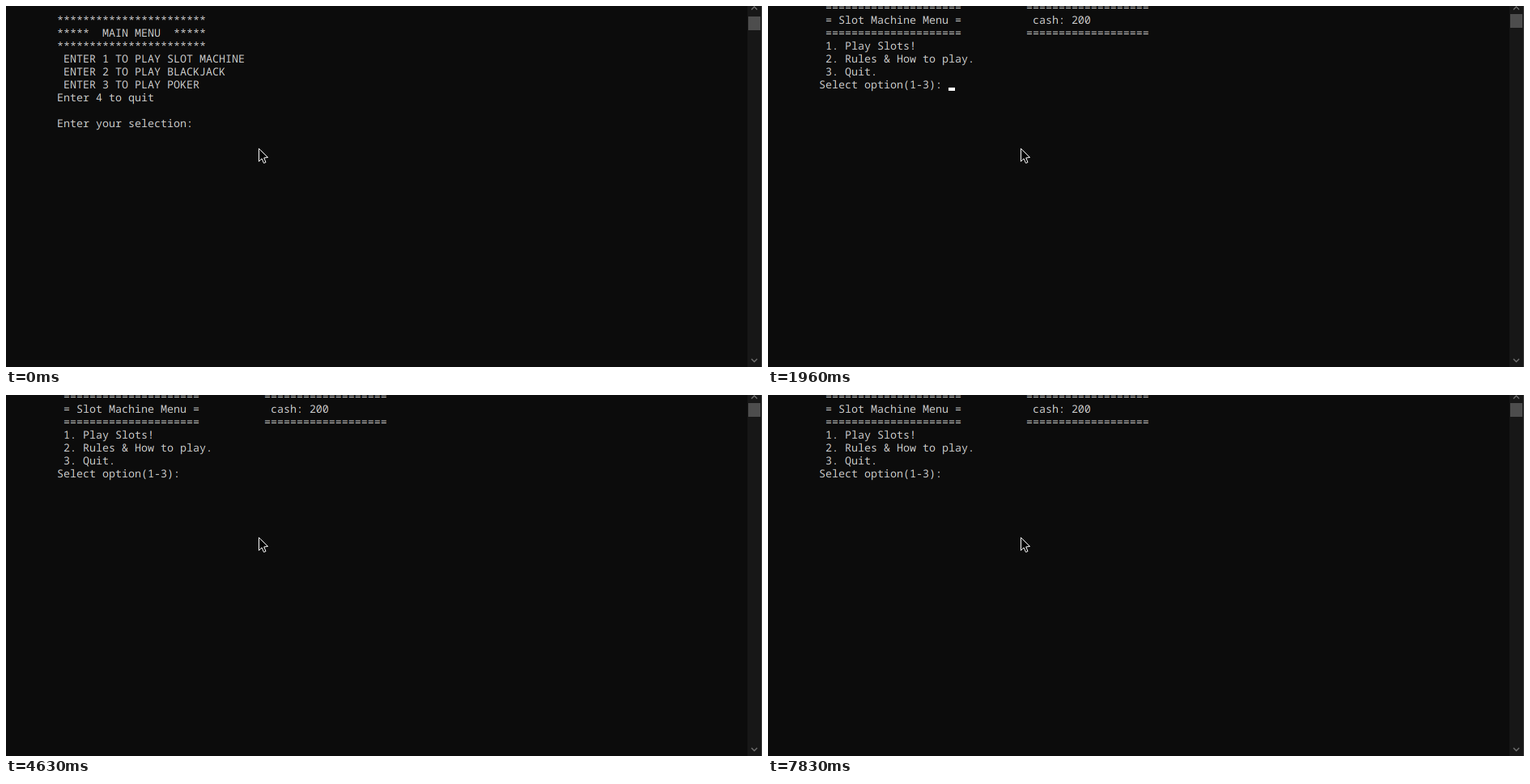
These frames come from a looping animation (934 px wide and 447 px high, 8000 ms). An HTML page with a canvas:

```html
<!DOCTYPE html>
<html lang="en">
<head>
<meta charset="utf-8">
<title>Console menu</title>
<style>
  html, body { margin: 0; width: 100%; height: 100%; overflow: hidden; background: #0c0c0c; }
  canvas { display: block; }
</style>
</head>
<body>
<canvas id="stage" width="934" height="447"></canvas>
<script>
const ctx = document.getElementById('stage').getContext('2d');
const LOOP = 8000;
const CELL = 8, ROW = 16, LEFT = 63;
const TYPED = 1550, SWITCH = 1960;

// The caret toggles at each of these times, starting hidden.
const BLINKS = [450, 1010, 1400, 2520, 2980, 3530, 4070, 4630,
                5190, 5630, 6180, 6710, 7270, 7830];

const STARS = '*'.repeat(23);
const RULES = ' ' + '='.repeat(21) + ' '.repeat(10) + '='.repeat(19);

const MAIN = {
  top: 9, thumb: 13,
  lines: [
    STARS,
    '*****  MAIN MENU  *****',
    STARS,
    ' ENTER 1 TO PLAY SLOT MACHINE',
    ' ENTER 2 TO PLAY BLACKJACK',
    ' ENTER 3 TO PLAY POKER',
    'Enter 4 to quit',
    '',
    'Enter your selection: '
  ]
};
const SLOTS = {
  top: -7, thumb: 10,
  lines: [
    RULES,
    ' = Slot Machine Menu =' + ' '.repeat(11) + 'cash: 200',
    RULES,
    ' 1. Play Slots!',
    ' 2. Rules & How to play.',
    ' 3. Quit.',
    'Select option(1-3): '
  ]
};

function rect(color, x, y, w, h) {
  ctx.fillStyle = color;
  ctx.fillRect(x, y, w, h);
}

function path(points, color, closed) {
  ctx.beginPath();
  points.forEach(([x, y]) => ctx.lineTo(x, y));
  if (closed) {
    ctx.closePath();
    ctx.fillStyle = '#000';
    ctx.fill();
  }
  ctx.strokeStyle = color;
  ctx.stroke();
}

// Colour channels are offset slightly, like LCD text smoothing.
function text(str, x, y) {
  ctx.globalCompositeOperation = 'lighter';
  [['#c00000', 0.25], ['#00c000', 0], ['#0000c0', -0.25]].forEach(([color, dx]) => {
    ctx.fillStyle = color;
    ctx.fillText(str, x + dx, y);
  });
  ctx.globalCompositeOperation = 'source-over';
}

function scrollbar(thumb) {
  rect('#171717', 916, 0, 17, 447);
  rect('#3c3c3c', 933, 0, 1, 447);
  rect('#4d4d4d', 917, thumb, 15, 17);
  ctx.lineWidth = 1.4;
  path([[921, 4.5], [924.5, 1], [928, 4.5]], '#707070');
  path([[921, 437], [924.5, 440.5], [928, 437]], '#707070');
}

function pointer() {
  ctx.save();
  ctx.translate(312.5, 176.5);
  ctx.lineWidth = 1;
  path([[0, 0], [0, 16], [3.5, 12.5], [6, 18], [8.5, 17], [6.2, 11.5], [11, 11]], '#fff', true);
  ctx.restore();
}

function draw(t) {
  const screen = t < SWITCH ? MAIN : SLOTS;
  const lines = screen.lines.slice();
  const last = lines.length - 1;
  if (t >= TYPED && t < SWITCH) lines[last] += '1';

  rect('#0c0c0c', 0, 0, 934, 447);
  ctx.font = '13.3333px "Noto Sans Mono", "DejaVu Sans Mono", monospace';
  ctx.textRendering = 'geometricPrecision';
  lines.forEach((line, i) => text(line, LEFT, screen.top + i * ROW + 13));

  if (BLINKS.filter(b => b <= t).length % 2) {
    rect('#fff', LEFT + lines[last].length * CELL, screen.top + last * ROW + 12, CELL, 4);
  }
  scrollbar(screen.thumb);
  pointer();
}

const start = performance.now();
function tick() {
  draw((performance.now() - start) % LOOP);
  requestAnimationFrame(tick);
}
tick();
</script>
</body>
</html>
```
